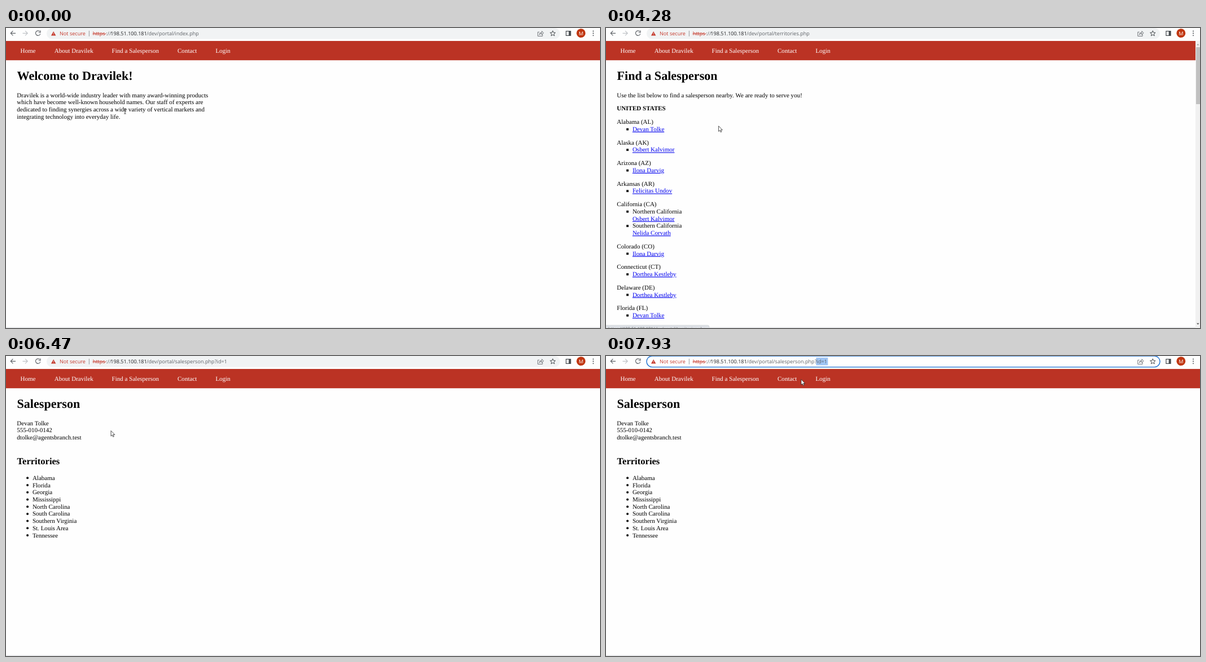
Recreate the animation shown at these times as an HTML page. Size 1053 by 532 pixels, loop 8000 ms.

```html
<!DOCTYPE html>
<html lang="en">
<head>
<meta charset="utf-8">
<title>Browsing a sales directory</title>
<style>
  html, body { margin: 0; width: 100%; height: 100%; overflow: hidden; background: #fefefe; }
  svg { display: block; width: 1053px; height: 532px; }
  text { text-rendering: geometricPrecision; white-space: pre; }
  .page text { font: 11.06px "Liberation Serif", "Times New Roman", serif; fill: #000; }
  .page .h1 { font-size: 22.12px; font-weight: bold; }
  .page .h2 { font-size: 16.59px; font-weight: bold; }
  .page .b { font-weight: bold; }
  .page .link { fill: #0000ee; text-decoration: underline; }
  .page .nav { fill: #fff; }
  .ui text { font: 9.1px "Open Sans", sans-serif; fill: #5f6368; }
  .ui .red { fill: #c5392c; }
  .ui .dark { fill: #202124; }
  .ui .small { font-size: 7.6px; }
  .icon { fill: none; stroke: #5f6368; stroke-width: 1.2; }
</style>
</head>
<body>
<svg id="stage" viewBox="0 0 1053 532"></svg>
<script>
const LOOP = 8000, LINE = 12.72, GAP = 11.06;
const svg = document.getElementById('stage');

function add(parent, tag, attrs, text) {
  const el = document.createElementNS('http://www.w3.org/2000/svg', tag);
  for (const k in attrs) el.setAttribute(k, attrs[k]);
  if (text !== undefined) el.textContent = text;
  parent.appendChild(el);
  return el;
}
const group = (parent, cls = '') => add(parent, 'g', { class: cls });
const rect = (p, x, y, width, height, fill, more) => add(p, 'rect', { x, y, width, height, fill, ...more });
const label = (p, x, y, text, cls = '') => add(p, 'text', { x, y, class: cls }, text);
const path = (p, d, attrs) => add(p, 'path', { d, class: 'icon', ...attrs });
const show = (el, on) => el.setAttribute('display', on ? 'inline' : 'none');

// Pages
rect(svg, 0, 0, 1053, 532, '#fefefe');
rect(svg, 0, 530.5, 1053, 1.5, '#e4e5e7');

const home = group(svg, 'page');
label(home, 19.5, 92.2, 'Welcome to Dravilek!', 'h1');
[
  'Dravilek is a world-wide industry leader with many award-winning products',
  'which have become well-known household names. Our staff of experts are',
  'dedicated to finding synergies across a wide variety of vertical markets and',
  'integrating technology into everyday life.'
].forEach((s, i) => label(home, 19.3, 122.6 + i * LINE, s));

const [rep, osbert, ilona, dorthea] = ['Devan Tolke', 'Osbert Kalvimor', 'Ilona Darvig', 'Dorthea Kestleby'];
const list = group(svg, 'page');
label(list, 19.5, 92.2, 'Find a Salesperson', 'h1');
label(list, 19.3, 122.6, 'Use the list below to find a salesperson nearby. We are ready to serve you!');
label(list, 19.3, 146.4, 'UNITED STATES', 'b');
let row = 170.2;
[
  ['Alabama (AL)', rep],
  ['Alaska (AK)', osbert],
  ['Arizona (AZ)', ilona],
  ['Arkansas (AR)', 'Felicitas Undov'],
  ['California (CA)', osbert, 'Northern California', 'Nelida Corvath', 'Southern California'],
  ['Colorado (CO)', ilona],
  ['Connecticut (CT)', dorthea],
  ['Delaware (DE)', dorthea],
  ['Florida (FL)', rep]
].forEach(([state, ...people]) => {
  label(list, 19.3, row, state);
  for (let i = 0; i < people.length; i += 2) {
    rect(list, 36.2, row + LINE - 5.2, 3.8, 3.8, '#000');
    if (people[i + 1]) label(list, 46.9, row += LINE, people[i + 1]);
    label(list, 46.9, row += LINE, people[i], 'link');
  }
  row += LINE + GAP;
});

const person = group(svg, 'page');
label(person, 19.5, 92.2, 'Salesperson', 'h1');
[rep, '555-010-0142', 'dtolke@agentsbranch.test'].forEach((s, i) => label(person, 19.3, 122.6 + i * LINE, s));
label(person, 19.5, 192.3, 'Territories', 'h2');
['Alabama', 'Florida', 'Georgia', 'Mississippi', 'North Carolina', 'South Carolina',
  'Southern Virginia', 'St. Louis Area', 'Tennessee'].forEach((s, i) => {
  const y = 219.8 + i * LINE;
  add(person, 'circle', { cx: 38.1, cy: y - 3.5, r: 2 });
  label(person, 46.9, y, s);
});

// Site navigation
const nav = group(svg, 'page');
rect(nav, 0, 22.8, 1053, 34.4, '#bb3324');
[[25.5, 'Home'], [85.8, 'About Dravilek'], [187.6, 'Find a Salesperson'], [304, 'Contact'], [371.5, 'Login']]
  .forEach(([x, s]) => label(nav, x, 44.4, s, 'nav'));

const scrollbar = group(svg);
rect(scrollbar, 1045, 23, 8, 509, '#f1f1f1');
rect(scrollbar, 1046, 34, 7, 101, '#c1c1c1');
path(scrollbar, 'M1047 30.5l2.3-2.6 2.3 2.6z', { style: 'fill:#a3a3a3;stroke:none' });
path(scrollbar, 'M1047 523.5l2.3 2.6 2.3-2.6z', { style: 'fill:#505050;stroke:none' });

// Browser toolbar
const ui = group(svg, 'ui');
rect(ui, 0, 0, 1053, 22.8, '#fefefe');
const pill = rect(ui, 72, 0, 910, 19.6, '#f1f3f4', { rx: 9.8 });
path(ui, 'M17 9.3H8.5M12.4 5.2 8.3 9.3l4.1 4.1');
path(ui, 'M29.5 9.3H38M34.1 5.2l4.1 4.1-4.1 4.1', { style: 'stroke:#bfc2c6' });
const reload = path(ui, 'M60 6.2A4.3 4.3 0 1 0 60.9 10.4M61 4.6V8H57.6');
const stop = path(ui, 'M52.8 5.3l7.8 7.8M60.6 5.3l-7.8 7.8');
path(ui, 'M84.2 6l4.2 7.4H80z', { style: 'fill:#c5392c;stroke:none' });
rect(ui, 83.8, 8.4, 0.8, 2.4, '#f1f3f4');
rect(ui, 83.8, 11.5, 0.8, 0.8, '#f1f3f4');
label(ui, 95, 13, 'Not secure', 'red');
rect(ui, 146.9, 4.8, 0.9, 10, '#8b8e92');
const marked = rect(ui, 372.4, 2.8, 21, 13.8, '#a0c5f4');
label(ui, 153.8, 13, 'https', 'red');
rect(ui, 153.6, 9.8, 24, 0.9, '#c5392c');
label(ui, 177.4, 13, '://');
label(ui, 185.3, 13, '198.51.100.181', 'dark');
const address = label(ui, 249.2, 13, '');

path(ui, 'M945.5 7.2h-2.7v7.2h8.2v-2.6M945.4 11.8q.5-4 4.6-4V5.6l3 3.2-3 3.2V9.7q-3 0-4.6 2.1z', { style: 'stroke-width:.9' });
const star = Array.from({ length: 10 }, (_, i) => {
  const r = i % 2 ? 2.2 : 5, a = i * Math.PI / 5;
  return (969.3 + r * Math.sin(a)).toFixed(2) + ' ' + (9.8 - r * Math.cos(a)).toFixed(2);
});
path(ui, 'M' + star.join('L') + 'z', { style: 'stroke:#45494d;stroke-width:1' });
rect(ui, 992.9, 5.6, 8, 7.8, 'none', { stroke: '#45494d', 'stroke-width': 1.2 });
rect(ui, 997.6, 5.6, 3.6, 7.8, '#45494d');
add(ui, 'circle', { cx: 1019.3, cy: 9.2, r: 7.9, fill: '#c0350f' });
add(ui, 'text', { x: 1019.3, y: 12.5, 'text-anchor': 'middle', style: 'fill:#fff' }, 'M');
for (const cy of [5.6, 9.4, 13.2]) add(ui, 'circle', { cx: 1041, cy, r: 1.05, fill: '#5f6368' });

// Link preview in the corner
const bubble = group(svg, 'ui');
const bubbleBox = path(bubble, '', { style: 'fill:#dee1e6;stroke:#c9ccd1;stroke-width:.5' });
const bubbleText = label(bubble, 4, 535.8, '', 'small');

// Pointers, drawn with the hotspot at 0,0
const pointers = {
  beam: 'M-1.7-4.4h1.3l.4.4.4-.4h1.3M0-4V4.2M-1.7 4.6h1.3l.4-.4.4.4h1.3',
  arrow: 'M0 0V9.6l2.2-2 1.5 3.3 1.6-.7-1.5-3.2h3z',
  hand: 'M-1 6.8V.5a.9.9 0 0 1 1.8 0V4l3 .6q1.2.4 1.1 1.8L4.3 9.4l-.8 1.9H-.6L-3.1 7.6q-.6-1 .2-1.4.8-.2 1.9 1.2z'
};
for (const k in pointers) {
  pointers[k] = path(svg, pointers[k], {
    style: k === 'beam' ? 'stroke:#222;stroke-width:.9' : 'fill:#fff;stroke:#222;stroke-width:.8'
  });
}

// Moves: first step, last step, number of steps, end point
const moves = [
  [270, 880, 9, 248, 43],
  [3730, 4410, 10, 194, 189],
  [4480, 4940, 7, 86, 180],
  [6210, 6940, 11, 419, 22],
  [7010, 7140, 3, 413, 12.5],
  [7270, 7460, 3, 374, 10],
  [7860, 7930, 2, 346, 41.5]
];
function pointerAt(t) {
  let x = 211, y = 147.5;
  for (const [from, to, n, ex, ey] of moves) {
    if (t < from) break;
    const k = Math.min(1, (Math.floor((t - from) / (to - from) * (n - 1) + 1e-6) + 1) / n);
    const e = k * k * (3 - 2 * k);
    x += (ex - x) * e;
    y += (ey - y) * e;
  }
  return [x, y];
}

const within = (x, y, boxes) => boxes.some(([l, t, r, b]) => x >= l && x <= r && y >= t && y <= b);
const navLinks = [[25, 53], [86, 155], [187, 271], [304, 339], [371, 398]].map(([l, r]) => [l, 34, r, 48]);
const texts = new Map([
  [home, [[19, 112, 358, 163], [19, 74, 224, 97]]],
  [list, [[19, 112, 347, 125], [19, 74, 197, 97]]],
  [person, [[19, 112, 133, 151], [19, 74, 131, 97]]]
]);
function pointerKind(x, y, page) {
  const links = page === list ? [...navLinks, [46, 174, 105, 186]] : navLinks;
  if (within(x, y, links)) return 'hand';
  return within(x, y, [[72, 0, 940, 20], ...texts.get(page)]) ? 'beam' : 'arrow';
}

const base = '/dev/portal/', site = 'https://198.51.100.181' + base;
const files = ['index.php', 'territories.php', 'salesperson.php?id=1'];

function draw(t) {
  const page = t < 3670 ? home : t < 6210 ? list : person;
  for (const p of [home, list, person]) show(p, p === page);
  show(scrollbar, page === list);
  address.textContent = base + files[t < 3670 ? 0 : t < 6140 ? 1 : 2];

  const loading = (t >= 1080 && t < 3670) || (t >= 5470 && t < 6140);
  show(stop, loading);
  show(reload, !loading);

  const [x, y] = pointerAt(t);
  const focused = t >= 7270, hover = t >= 7010 && !focused;
  pill.setAttribute('fill', focused ? '#fff' : hover ? '#e9ebed' : '#f1f3f4');
  pill.setAttribute('stroke', focused ? '#1b6fd0' : 'none');
  pill.setAttribute('stroke-width', 1.4);
  const left = Math.max(372.4, Math.min(393.4, x - 1.6));
  show(marked, focused);
  marked.setAttribute('x', left);
  marked.setAttribute('width', 393.4 - left);

  const wide = t >= 4340;
  const edge = wide ? 211 : 183;
  show(bubble, t >= 1020 && t < 6350);
  bubble.setAttribute('opacity', t < 1080 ? 0.4 : t < 1140 ? 0.75 : t < 6210 ? 1 : t < 6280 ? 0.6 : 0.25);
  bubbleBox.setAttribute('d', `M-1 534V527H${edge - 3}q3 0 3 3v4z`);
  bubbleText.textContent = site + files[wide ? 2 : 1];

  const kind = pointerKind(x, y, page);
  for (const k in pointers) show(pointers[k], k === kind);
  pointers[kind].setAttribute('transform', `translate(${x.toFixed(2)} ${y.toFixed(2)})`);
}

const start = performance.now();
function tick() {
  draw((performance.now() - start) % LOOP);
  requestAnimationFrame(tick);
}
tick();
</script>
</body>
</html>
```
